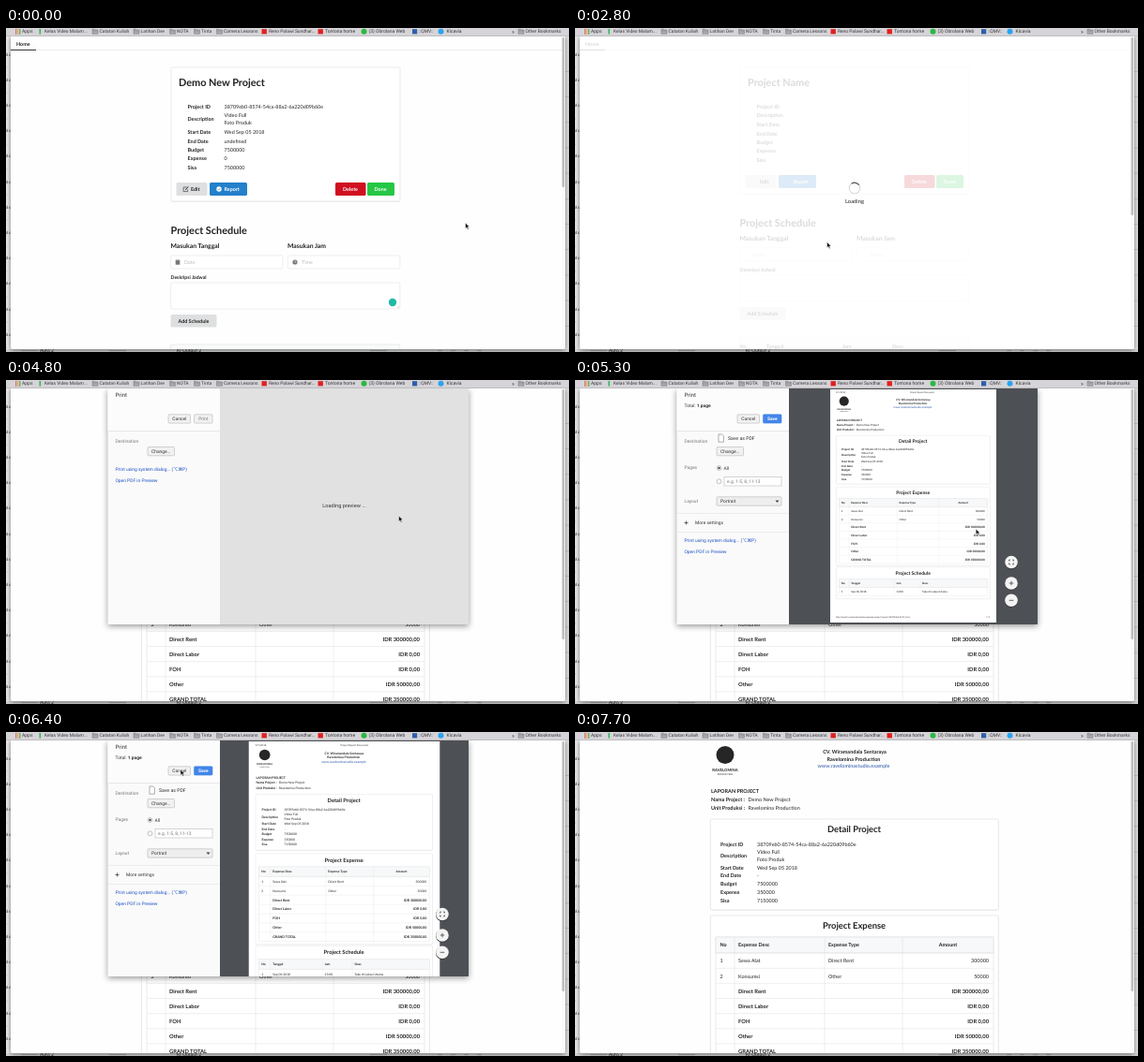
Animation, 600 px wide and 346 px high, one loop 7800 ms. Source, as an HTML page:

```html
<!DOCTYPE html>
<html lang="en">
<head>
<meta charset="utf-8">
<title>Project report walkthrough</title>
<style>
  html, body { margin: 0; width: 100%; height: 100%; overflow: hidden; background: #d6d6d6; }
  svg { position: absolute; left: 0; top: 0; width: 100vw; height: 100vh; }
  #hood { position: absolute; inset: 0; clip-path: inset(9px 0 0 0); }
  #print { transform-origin: 300.7px 261px; filter: drop-shadow(0 2px 3px rgba(0, 0, 0, .4)); }
  text { font-family: Lato, "Open Sans", sans-serif; fill: #222; text-rendering: geometricPrecision; white-space: pre; }
  .b { font-weight: 700; }
  .ui text { font-family: Roboto, Inter, sans-serif; fill: #333; }
  .ui .link { fill: #1a4fc4; }
  .ui .soft { fill: #777; }
  .ui .save { fill: #fff; }
  .ui .url, .url { fill: #2452a8; }
  .ui .paper text { font-family: Lato, "Open Sans", sans-serif; }
  .w { fill: #fff; }
  .hint { fill: #bbb; }
  .mid { text-anchor: middle; }
  .end { text-anchor: end; }
</style>
</head>
<body>
<svg id="stage" viewBox="0 0 600 346"></svg>
<div id="hood"><svg id="print" class="ui" viewBox="0 0 600 346"></svg></div>
<svg id="front" viewBox="0 0 600 346"></svg>
<script>
const LOOP = 7800, STEP = 100;

// Drawing helpers; text is placed by the middle of its capitals
const text = (x, y, s, size = 5.45, cls = '') =>
  `<text x="${x}" y="${y + size * .36}" font-size="${size}" class="${cls}">${s}</text>`;
const rect = (x, y, w, h, fill, stroke = 'none', r = 0) =>
  `<rect x="${x}" y="${y}" width="${w}" height="${h}" rx="${r}" fill="${fill}" stroke="${stroke}" stroke-width=".6"/>`;
const disc = (x, y, r, fill) => `<circle cx="${x}" cy="${y}" r="${r}" fill="${fill}"/>`;
const path = (d, stroke, width = .6, fill = 'none') =>
  `<path d="${d}" fill="${fill}" stroke="${stroke}" stroke-width="${width}"/>`;
const group = (id, body, extra = '') => `<g id="${id}" ${extra}>${body}</g>`;
const box = (x, y, w, h) => rect(x, y, w, h, '#fff', '#e2e2e2', 1.5);
const card = (x, y, w, h) => rect(x, y + .6, w, h, '#e6e6e6', 'none', 1.5) + rect(x, y, w, h, '#fff', '#dcdcde', 1.5);
const button = (x, y, w, h, fill, label, tx, cls = 'b w') =>
  rect(x, y, w, h, fill, 'none', 1.6) + text(tx, y + h / 2, label, 5.4, cls);

const NAME = 'Demo New Project';
const STUDIO = 'Ravelomina Production';
const ID = '38709eb0-8574-54ca-88a2-6a220d09b60e';
const WINDOW = 'M5 9H596V340q0 3-3 3H8q-3 0-3-3z';

function backdrop() {
  let s = rect(0, 0, 600, 346, '#dcdcdc') + rect(0, 9, 5, 337, '#e8e8e8') + rect(596, 9, 4, 337, '#e0e0e0');
  for (let i = 0; i < 12; i++) {
    const y = 28 + i * 27.2;
    s += text(-3, y, 'nd c', 4.4) + text(-2, y + 14, 'rp', 3.6, 'hint');
    s += rect(596, y + 18, 4, .6, '#b5b5b5');
  }
  s += rect(0, 343, 600, 3, '#cfcfcf');
  s += text(36, 344.6, 'Auto 2', 5) + text(182, 344.6, 'KI Output 2', 5);
  for (const x of [16, 110, 388, 460, 474, 488, 502]) s += rect(x, 344, x < 450 ? 18 : 5, 1.2, '#aaa');
  return s;
}

function bookmarks() {
  let s = rect(0, 0, 600, 8.6, '#d6d4d8') + rect(0, 8.4, 600, .6, '#b4b4b4');
  const dots = ['#d9534a', '#e0a52f', '#4a9a58'];
  for (let i = 0; i < 9; i++) s += rect(10 + i % 3 * 2, 1.2 + (i / 3 | 0) * 2, 1.4, 1.4, dots[i % 3]);
  s += text(17, 3.6, 'Apps', 5) + rect(35.5, 1, 1.6, 5.5, '#35b558') + text(41, 3.6, 'Kelas Video Malam...', 4.9);
  const folder = (x, label) => path(`M${x} 1.2h2.2l.7 .9h3.1v4.2h-6z`, '#777', .5, '#a9a9ad') +
    path(`M${x} 3h6`, '#777', .4) + text(x + 7.6, 3.6, label, 4.9);
  [[92, 'Catatan Kuliah'], [136, 'Latihan Dev'], [174.5, 'NOTA'], [200.5, 'Tinta'], [224.5, 'Camera Lessons'],
   [546, 'Other Bookmarks']].forEach(f => s += folder(...f));
  s += rect(272.5, 1.2, 5.4, 5.2, '#e02020') + text(280, 3.6, 'Reno Palawi Sundhar...', 4.9);
  s += rect(332.5, 1.2, 5.4, 5.2, '#e02020') + text(340, 3.6, 'Tontona home', 5);
  s += disc(381.5, 3.8, 3, '#2bb741') + text(386.5, 3.6, '(3) Obrolana Web', 5);
  s += rect(433, 1.2, 5.2, 5.2, '#2c5fa8') + text(440, 3.6, '::QMV::', 4.9);
  s += disc(463.5, 3.8, 3, '#2aa3ef') + text(469.5, 3.6, 'Kicavia', 5);
  return s + text(539, 3.4, '»', 6);
}

const navbar = () => text(11, 16.8, 'Home', 5.4, 'b') + rect(5, 23.5, 591, .5, '#dcdcdc') + rect(5, 23, 27, .9, '#222');

// Rows of label and value; the description holds two lines
function details(x, vx, ys, values, spread) {
  const labels = ['Project ID', 'Description', 'Start Date', 'End Date', 'Budget', 'Expense', 'Sisa'];
  return labels.map((l, i) => {
    const s = text(x, ys[i], l, 5.45, 'b');
    if (!values) return s;
    if (i === 1) return s + text(vx, ys[1] - spread, 'Video Full') + text(vx, ys[1] + spread, 'Foto Produk');
    return s + text(vx, ys[i], values[i], 5.42);
  }).join('');
}

function buttonIcons() {
  return path('M192.5 170h-3.4v4.6h4.6v-2', '#555', .8) + path('M191.2 172.8l3.2-3.4', '#555', 1.1) +
    disc(227, 172, 2.7, '#fff') + path('M225.7 172l1 1 1.7-2', '#2380cb', .7) +
    rect(180.7, 248.4, 4.6, 4.4, '#777', 'none', .5) + rect(180.7, 247.6, 4.6, 1.2, '#777') +
    disc(308, 250, 2.6, '#777') + path('M308 248.4v1.7h1.3', '#fff', .6) + disc(412, 293, 4.2, '#20b9a6');
}

// Before its data arrives the page is shorter and has no icons
function project(loaded) {
  const ys = loaded ? [84, 97.3, 111, 121, 130, 139.5, 149] : [84, 93.5, 103, 113, 122, 131.5, 141];
  const values = loaded && [ID, '', 'Wed Sep 05 2018', 'undefined', '7500000', '0', '7500000'];
  const s = navbar() + card(176, 42, 244, loaded ? 143 : 135) +
    text(184, 58, loaded ? NAME : 'Project Name', 10.9, 'b') + details(193.5, 232.5, ys, values, 4);
  let r = button(181.5, 165, 33, 14, '#dedfe0', 'Edit', 197, 'b') + button(217, 165, 40, 14, '#2380cb', 'Report', 232.5);
  r += button(351, 165, 32.5, 14, '#d01020', 'Delete', 359) + button(385, 165, 29, 14, '#25c745', 'Done', 392.5);
  r += text(175.5, 216, 'Project Schedule', 10.9, 'b');
  r += text(175.5, 233, 'Masukan Tanggal', 6.8, 'b') + text(300, 233, 'Masukan Jam', 6.8, 'b');
  r += box(175.5, 243, 119.5, 14) + box(300.3, 243, 119.5, 14);
  r += text(190, 250.3, 'Date', 5.45, 'hint') + text(315, 250.3, 'Time', 5.45, 'hint');
  r += text(175.5, 266, 'Deskripsi Jadwal', 5.15, 'b') + box(175.5, 272, 244.3, 28);
  r += path('M416.8 299l2.2-2.2M418 299.2l1-1', '#aaa', .4);
  r += button(175.5, 306, 49, 13.5, '#dedfe0', 'Add Schedule', 183.5, 'b');
  r += rect(175.5, 338, 244.3, 20, '#f9fafb', '#dedede', 1);
  [[175.5, 'No'], [204, 'Tanggal'], [285, 'Jam'], [338, 'Desc']].forEach(([x, l]) => r += text(x, 348.5, l, 5.45, 'b'));
  return s + `<g transform="translate(0 ${loaded ? 0 : -8})">${r + (loaded ? buttonIcons() : '')}</g>`;
}

function edit() {
  const label = (y, l) => text(179, y, l, 5.15, 'b');
  let s = navbar() + text(574.5, 16.8, 'Logout', 5.2) + text(178.5, 49, 'Project Edit', 10.9, 'b');
  s += label(65, 'Project Name') + box(179, 71, 245, 13.5) + label(94, 'Description') + box(179, 100, 245, 60);
  s += path('M420.8 159l2.2-2.2', '#aaa', .4);
  s += label(169.5, 'Project Status') + box(179, 175, 245, 13.5) + path('M414.3 181h4l-2 2.4z', 'none', 0, '#444');
  s += label(198, 'Budget') + box(179, 204, 245, 13.5) + button(179, 223, 32.5, 14, '#2380cb', 'Submit', 186.5);
  s += group('blank', text(184, 77.8, 'Project Name', 5.45, 'hint') + text(184, 210.8, 'Enter budget amount', 5.45, 'hint'));
  return s + group('filled', text(184, 77.8, NAME) + text(184, 107, 'Video Full') + text(184, 115, 'Foto Produk') +
    text(184, 210.8, '7500000'));
}

function table(tops, cols, right) {
  const top = tops[0], end = tops[tops.length - 1];
  return rect(cols[0], top, right - cols[0], end - top, '#fff', '#dedede', 1) +
    rect(cols[0], top, right - cols[0], tops[1] - top, '#f7f8f9', '#dedede') +
    path(tops.slice(1, -1).map(y => `M${cols[0]} ${y}H${right}`).join('') +
      cols.slice(1).map(x => `M${x} ${top}V${end}`).join(''), '#dfdfdf', .5);
}

function report() {
  let s = disc(160, 24.5, 9.5, '#262626') + text(160, 40.8, 'RAVELOMINA', 4.2, 'b mid') + text(160, 45.4, 'PRODUCTION', 2.5, 'mid');
  s += text(298, 21.5, 'CV. Wiramandala Sentaraya', 5.5, 'b mid') + text(297, 29, STUDIO, 5.5, 'b mid');
  s += text(297, 36.3, 'www.ravelominastudio.example', 5.5, 'mid url');
  s += text(145, 63.3, 'LAPORAN PROJECT', 5.5, 'b') + text(145, 72.3, 'Nama Project :', 5.5, 'b') + text(145, 81.3, 'Unit Produksi :', 5.5, 'b');
  s += text(184.5, 72.3, NAME) + text(184.5, 81.3, STUDIO);
  s += card(144.3, 93, 307, 97) + text(297.5, 103.6, 'Detail Project', 9.4, 'b mid');
  s += details(155, 194, [119.8, 132, 144.6, 153.5, 162.2, 171.2, 180.2],
    [ID, '', 'Wed Sep 05 2018', '-', '7500000', '350000', '7150000'], 3.7);
  s += card(144.3, 196, 307, 158) + text(297.5, 207, 'Project Expense', 9.4, 'b mid');
  s += table([219, 236, 252.3, 268.4, 284.5, 300.6, 316.7, 332.8, 349], [150, 170, 266, 349], 446);
  s += text(154.5, 227.4, 'No', 5.4, 'b') + text(174, 227.4, 'Expense Desc', 5.4, 'b') +
    text(270, 227.4, 'Expense Type', 5.4, 'b') + text(397.5, 227.4, 'Amount', 5.4, 'b mid');
  [['Sewa Alat', 'Direct Rent', '300000'], ['Konsumsi', 'Other', '50000']].forEach(([a, b, c], i) => {
    const y = 244.5 + i * 16.2;
    s += text(154.5, y, i + 1) + text(174, y, a) + text(270, y, b) + text(441, y, c, 5.45, 'end');
  });
  [['Direct Rent', 300000], ['Direct Labor', 0], ['FOH', 0], ['Other', 50000], ['GRAND TOTAL', 350000]].forEach(([a, n], i) => {
    const y = 276.6 + i * 16.1;
    s += text(174, y, a, 5.8, 'b') + text(441, y, `IDR ${n},00`, 5.8, 'b end');
  });
  s += card(144.3, 357, 307, 63) + text(297.5, 368, 'Project Schedule', 9.4, 'b mid');
  s += table([380, 397, 413.5], [150, 170, 260, 312], 446);
  [[154.5, 'No', '1'], [174, 'Tanggal', 'Sep 06 2018'], [264, 'Jam', '13:00'], [316, 'Desc', 'Take di Lokasi Utama']].forEach(
    ([x, h, v]) => s += text(x, 388.6, h, 5.4, 'b') + text(x, 405.4, v));
  return s;
}

function printSheet() {
  const push = (x, y, w, label, fill = '#f1f1f1', cls = 'mid') =>
    rect(x, y, w, 9.3, fill, fill === '#f1f1f1' ? '#b5b5b5' : fill, 1) + text(x + w / 2, y + 4.7, label, 4.9, cls);
  const links = y => text(116.5, y, 'Print using system dialog... (⌥⌘P)', 4.9, 'link') +
    text(116.5, y + 12, 'Open PDF in Preview', 4.9, 'link');
  const radio = y => `<circle cx="153.5" cy="${y}" r="2.4" fill="#fff" stroke="#999" stroke-width=".6"/>`;
  let s = rect(108.5, 9, 384.5, 252, '#fafafa') + rect(108.5, 9, 119.5, 45.5, '#fcfcfc') + rect(108.5, 54.3, 119.5, .5, '#d2d2d2');
  s += text(116.5, 16, 'Print', 6) + push(173, 36.8, 23.5, 'Cancel') + text(116.5, 65, 'Destination', 4.9, 'soft');
  s += group('waiting', push(200.5, 36.8, 19.5, 'Print', '#f1f1f1', 'mid soft') + push(151, 71.5, 28.5, 'Change...') + links(95.5) +
    rect(228, 9, 265, 252, '#e1e1e1') + text(360.5, 133.5, 'Loading preview ...', 5.6, 'mid'));
  let r = text(116.5, 26.8, 'Total: <tspan font-weight="700">1 page</tspan>', 4.9);
  r += push(200.5, 36.8, 19.5, 'Save', '#4285e8', 'mid b save') + push(151, 71.5, 28.5, 'Change...');
  r += path('M153 58h3.6l1.8 1.8v6.4H153z', '#777', .6, '#fff') + text(163, 62.5, 'Save as PDF', 5.2);
  r += text(116.5, 93.5, 'Pages', 4.9, 'soft') + text(116.5, 129.5, 'Layout', 4.9, 'soft');
  r += radio(94) + disc(153.5, 94, 1.2, '#444') + radio(108.3) + text(158.5, 94, 'All', 4.9);
  r += rect(159, 103.5, 61, 9.5, '#fff', '#bbb') + text(162, 108.3, 'e.g. 1-5, 8, 11-13', 4.9, 'soft');
  r += rect(151, 124.8, 69, 9.4, '#eee', '#b5b5b5', 1) + text(155, 129.5, 'Portrait', 4.9) + path('M213.5 128.5h4l-2 2.5z', 'none', 0, '#444');
  r += rect(108.5, 142, 119.5, .5, '#ddd') + rect(108.5, 162.5, 119.5, .5, '#ddd');
  r += path('M116.5 152.5h4M118.5 150.5v4', '#444', .8) + text(128, 152.5, 'More settings', 4.9) + links(171.5);
  r += rect(228, 9, 265, 252, '#4d5155');
  const paper = rect(272, 10, 177, 249, '#fff') +
    '<use href="#sheet" transform="translate(201.3 9.5) scale(.534)"/>' +
    text(278, 13.3, '9/5/2018', 2.3) + text(370, 13.3, 'Project Report Document', 2.3, 'mid') +
    text(278, 253.3, 'http://reports.ravelominastudio.example/project/report/38709eb0-8574-54ca', 2.3) + text(442, 253.3, '1/1', 2.3, 'end');
  r += `<g clip-path="url(#view)">${group('paper', paper, 'class="paper"')}</g>`;
  for (const y of [194.5, 217, 235.3]) r += disc(465, y + .7, 7, '#3a3d40') + disc(465, y, 6.8, '#f4f4f4');
  r += path('M462.6 193.5v-1.4h1.4m2 0h1.4v1.4m0 2v1.4h-1.4m-2 0h-1.4v-1.4M462.7 217h4.6M465 214.7v4.6M462.7 235.3h4.6', '#444', .8);
  return s + group('ready', r);
}

const $ = id => document.getElementById(id);

$('stage').innerHTML = `
  <defs>
    <clipPath id="page"><path d="${WINDOW}"/></clipPath>
    <clipPath id="view"><rect x="228" y="9" width="265" height="252"/></clipPath>
    <filter id="shade" x="-5%" y="-5%" width="110%" height="110%"><feDropShadow dx="0" dy="1" stdDeviation="2.5" flood-opacity=".5"/></filter>
  </defs>
  ${backdrop()}
  <path d="${WINDOW}" fill="#fff" filter="url(#shade)"/>
  <g clip-path="url(#page)">
    ${rect(5, 9, 591, 334, '#fefefe')}
    ${group('loaded', project(true))}${group('empty', project(false))}${group('edit', edit())}
    ${group('report', group('sheet', report()))}
    ${group('dim', rect(5, 9, 591, 334, '#fff'))}
    ${group('scroll', rect(592, 9, 4, 334, '#fafafa') + '<rect id="thumb" x="592.6" y="10" width="2.6" rx="1.3" fill="#bdbdbd"/>')}
    ${group('loader', `<circle cx="0" cy="171" r="5.8" fill="none" stroke="#d8d8d8" stroke-width="1.1"/>` +
      group('arc', path('M4.1 -4.1A5.8 5.8 0 0 1 4.1 4.1', '#555', 1.2)) + text(0, 184.8, 'Loading', 5.8, 'mid'))}
  </g>`;
$('print').innerHTML = printSheet();
$('front').innerHTML = `<g class="ui">${bookmarks()}</g>` +
  group('cursor', group('arrow', path('M0 0V6.2L1.5 4.9 2.5 7.2 3.6 6.7 2.6 4.5H4.5z', '#fff', .5, '#111')) +
    group('hand', path('M-.8 0q.8-.8 1.4 0V2.4l3 .7q.6.3.4 1.2L3.4 7H.1L-2.2 4.2q0-1 1.4-.2z', '#222', .6, '#fff')));

const shown = (id, on) => $(id).style.display = on ? '' : 'none';
const move = (id, transform) => $(id).setAttribute('transform', transform);

// Linear interpolation through [time, ...values]
function track(points, t) {
  const i = points.findIndex(p => p[0] > t);
  if (i < 0) return points[points.length - 1].slice(1);
  if (i === 0) return points[0].slice(1);
  const a = points[i - 1], b = points[i], k = (t - a[0]) / (b[0] - a[0]);
  return a.slice(1).map((v, n) => v + (b[n + 1] - v) * k);
}

const pointer = [[0, 489.5, 208], [100, 486, 208], [700, 198, 172], [1200, 193.3, 173], [1700, 193.3, 173], [2100, 196, 230],
  [2400, 197, 230], [2800, 268.5, 228.5], [3200, 238, 171], [4000, 238, 171], [4800, 418.5, 145], [5200, 418.5, 145],
  [5700, 462, 214.5], [6000, 462, 214.5], [6400, 186, 40], [6500, 186, 40], [6800, 197.2, 56], [7300, 130, 30]];
const veil = [[800, 0], [900, .86], [1400, .86], [1600, 0], [2300, 0], [2400, .86], [2800, .84], [3100, 0],
  [3300, 0], [3400, .86], [3800, .86], [4000, 0]];
// Opacity, vertical shift and backward tilt in degrees
const fold = [[4400, 0, -20, 0], [4600, 1, 0, 0], [6500, 1, 0, 0], [6600, .9, -1, 1], [6800, .14, -8.5, 8], [6900, 0, -10, 10]];
const thumb = { loaded: 160, empty: 190, report: 267 };

function render(t) {
  const scene = t < 900 ? 'loaded' : t < 2400 ? 'edit' : t < 2900 ? 'empty' : t < 3400 ? 'loaded' : 'report';
  for (const id of ['loaded', 'empty', 'edit', 'report']) shown(id, id === scene);
  shown('blank', t < 1400);
  shown('filled', t >= 1400);
  shown('scroll', scene in thumb);
  $('thumb').setAttribute('height', thumb[scene] || 0);

  const [dim] = track(veil, t);
  $('dim').style.opacity = dim;
  $('loader').style.opacity = Math.min(1, dim / .8);
  move('loader', `translate(${scene === 'edit' ? 301 : 298} 0)`);
  move('arc', `translate(0 171) rotate(${t * .6 + 40})`);

  const [alpha, dy, tilt] = track(fold, t);
  shown('print', alpha > 0);
  $('print').style.opacity = alpha;
  $('print').style.transform = tilt
    ? `translateY(${dy}px) perspective(665px) rotateX(${tilt}deg) scaleY(${1 + tilt * .006})`
    : `translateY(${dy}px)`;
  shown('waiting', t < 5300);
  shown('ready', t >= 5300);
  move('paper', t < 5900 ? '' : 'translate(360.5 10) scale(1.15) translate(-360.5 -10)');

  const [x, y] = track(pointer, t), overZoom = t >= 5600 && t <= 6000;
  move('cursor', `translate(${x} ${y})`);
  shown('cursor', t < 7400);
  shown('hand', overZoom);
  shown('arrow', !overZoom);
}

const start = performance.now();
function tick() {
  const t = (performance.now() - start) % LOOP;
  render(Math.floor(t / STEP) * STEP);
  requestAnimationFrame(tick);
}
render(0);
requestAnimationFrame(tick);
</script>
</body>
</html>
```
